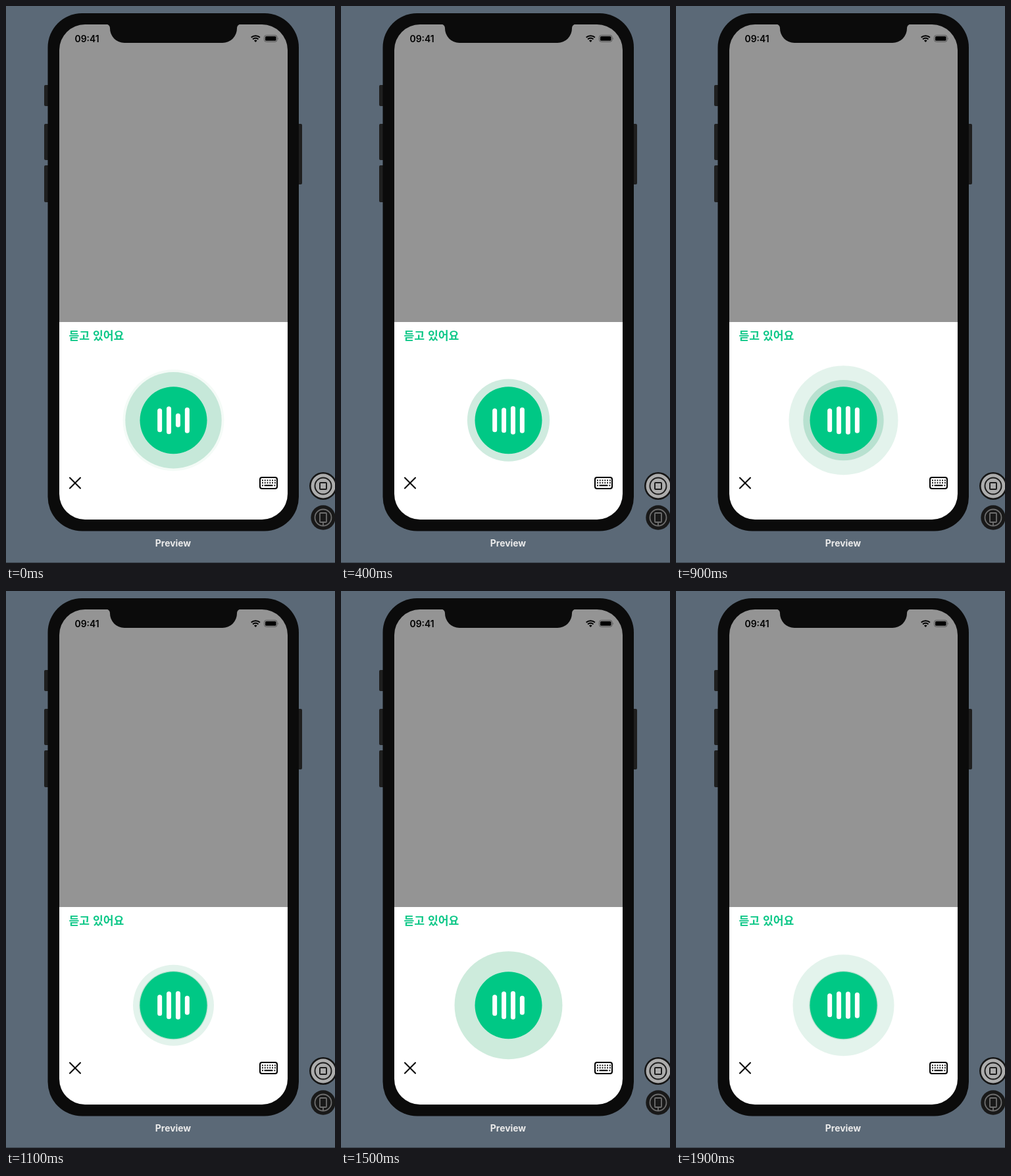
An HTML page for the animation above (2 s loop, 500 by 846 pixels).

```html
<!DOCTYPE html>
<html lang="ko">
<head>
<meta charset="utf-8">
<title>Voice input</title>
<style>
  html, body { margin: 0; width: 100%; height: 100%; overflow: hidden; background: #5b6977; }
  svg { display: block; width: 500px; height: 846px; }
  .latin { font: 600 13.9px Inter, sans-serif; }
  .caption { font-weight: 700; fill: #ebebeb; text-anchor: middle; }
  .status { font: 700 17.2px "Noto Sans CJK KR", "Noto Sans CJK", sans-serif; fill: #0cc787; }
  .line { fill: none; stroke: #000; stroke-width: 2; stroke-linecap: round; }
  .bars { stroke: #fff; stroke-width: 7; stroke-linecap: round; }
  .rings { fill: rgb(0, 150, 85); }
</style>
</head>
<body>
<svg viewBox="0 0 500 846">
  <rect width="500" height="846" fill="#5b6977"/>
  <path d="M0 845.5H500" stroke="#3c444d"/>

  <g fill="#1f1f1f">
    <rect x="58" y="120" width="10" height="32" rx="2"/>
    <rect x="58" y="179" width="10" height="55" rx="2"/>
    <rect x="58" y="242" width="10" height="56" rx="2"/>
    <rect x="440" y="179" width="10" height="92" rx="2"/>
  </g>
  <rect x="63.5" y="11" width="381.5" height="786.5" rx="52" fill="#0b0b0b"/>
  <clipPath id="screen"><rect x="81" y="28" width="347" height="752" rx="39"/></clipPath>
  <g clip-path="url(#screen)">
    <path d="M81 28h347v452H81z" fill="#949494"/>
    <path d="M81 480h347v300H81z" fill="#fff"/>
  </g>
  <path d="M152 27.5a6 6 0 0 1 6 6a22 22 0 0 0 22 22.500H329a22 22 0 0 0 22-22.500a6 6 0 0 1 6-6z" fill="#0b0b0b"/>

  <text class="latin" x="104.5" y="54.5">09:41</text>
  <path d="M372.700 47.800a9.500 9.500 0 0 1 13.200 0M375.100 50.500a6 6 0 0 1 8.400 0" fill="none" stroke="#000" stroke-width="2"/>
  <path d="M379.300 55l-2.300-2.500a3.400 3.400 0 0 1 4.600 0z"/>
  <rect x="392.5" y="44.5" width="19.5" height="9.800" rx="3" fill="none" stroke="#555"/>
  <rect x="394" y="46" width="16.5" height="6.800" rx="1.600"/>
  <path d="M413.200 47.800q1.500 1.500 0 3.400z" fill="#555"/>

  <text class="status" x="95.5" y="507">듣고 있어요</text>

  <g class="rings"></g>
  <circle cx="254.5" cy="629.2" r="51" fill="#00c885"/>
  <g class="bars"></g>

  <path class="line" d="M97 716.500l16 16M113 716.500l-16 16" stroke-width="2.500"/>
  <rect class="line" x="386" y="716" width="26" height="17" rx="3"/>
  <g stroke="#000" stroke-width="2">
    <path d="M389 720.500H410M389 724.300H410" stroke-dasharray="1.800 2"/>
    <path d="M389 728.300h1.800M392.500 728.300h13M407.500 728.300h1.800"/>
  </g>

  <circle cx="482" cy="729" r="21" fill="#151515"/>
  <circle cx="482" cy="729" r="18.5" fill="#acacac"/>
  <g fill="none" stroke="#1c1c1c" stroke-width="2">
    <circle cx="482" cy="729" r="12.5"/>
    <rect x="477" y="724" width="10" height="10" rx="1"/>
  </g>
  <circle cx="482" cy="777" r="18.7" fill="#191919"/>
  <g fill="none" stroke="#6e6e6e" stroke-width="1.8">
    <circle cx="482" cy="777" r="12.5"/>
    <rect x="477" y="770" width="10" height="14" rx="1"/>
    <path d="M482 784v5"/>
  </g>

  <text class="latin caption" x="254" y="821">Preview</text>
</svg>
<script>
  const LOOP = 2000, STEP = 100, RING_LIFE = 450;
  const CENTER = { x: 254.5, y: 629.2 };

  // Each ring bursts out to its radius, then fades.
  const rings = [
    { start: 300, radius: 63 },
    { start: 600, radius: 83 },
    { start: 800, radius: 61.5 },
    { start: 1100, radius: 82 },
    { start: 1300, radius: 82 },
    { start: 1600, radius: 77 },
    { start: 1900, radius: 74 }
  ];

  // Each bar rests at full height and dips once per loop.
  const bars = [
    { height: 36, dip: 4, at: 1300, reach: 270 },
    { height: 42, dip: 4, at: 400, reach: 180 },
    { height: 43, dip: 22, at: 110, reach: 215 },
    { height: 39, dip: 10, at: 1300, reach: 270 }
  ];

  function add(parent, tag) {
    const node = document.createElementNS('http://www.w3.org/2000/svg', tag);
    return document.querySelector(parent).appendChild(node);
  }

  for (const ring of rings) {
    ring.node = add('.rings', 'circle');
    ring.node.setAttribute('cx', CENTER.x);
    ring.node.setAttribute('cy', CENTER.y);
  }
  for (const bar of bars) bar.node = add('.bars', 'path');

  const clamp = v => Math.max(0, Math.min(1, v));

  function drawRing({ node, start, radius }, t) {
    const age = (t - start + LOOP) % LOOP;
    const spread = 1 - Math.exp(-age / 30);
    node.setAttribute('r', 52.2 + (radius - 52.2) * spread);
    node.setAttribute('opacity', 0.2 * clamp(1 - (age / RING_LIFE) ** 2));
  }

  function drawBar({ node, height, dip, at, reach }, i, t) {
    const gap = Math.abs(t - at);
    const distance = Math.min(gap, LOOP - gap);
    const stem = height - dip * clamp((reach - distance) / 60) - 7;
    const x = CENTER.x + (i - 1.5) * 13.9;
    node.setAttribute('d', `M${x} ${CENTER.y - stem / 2}v${stem}`);
  }

  function tick() {
    const t = Math.floor(performance.now() % LOOP / STEP) * STEP;
    rings.forEach(ring => drawRing(ring, t));
    bars.forEach((bar, i) => drawBar(bar, i, t));
    requestAnimationFrame(tick);
  }
  tick();
</script>
</body>
</html>
```
